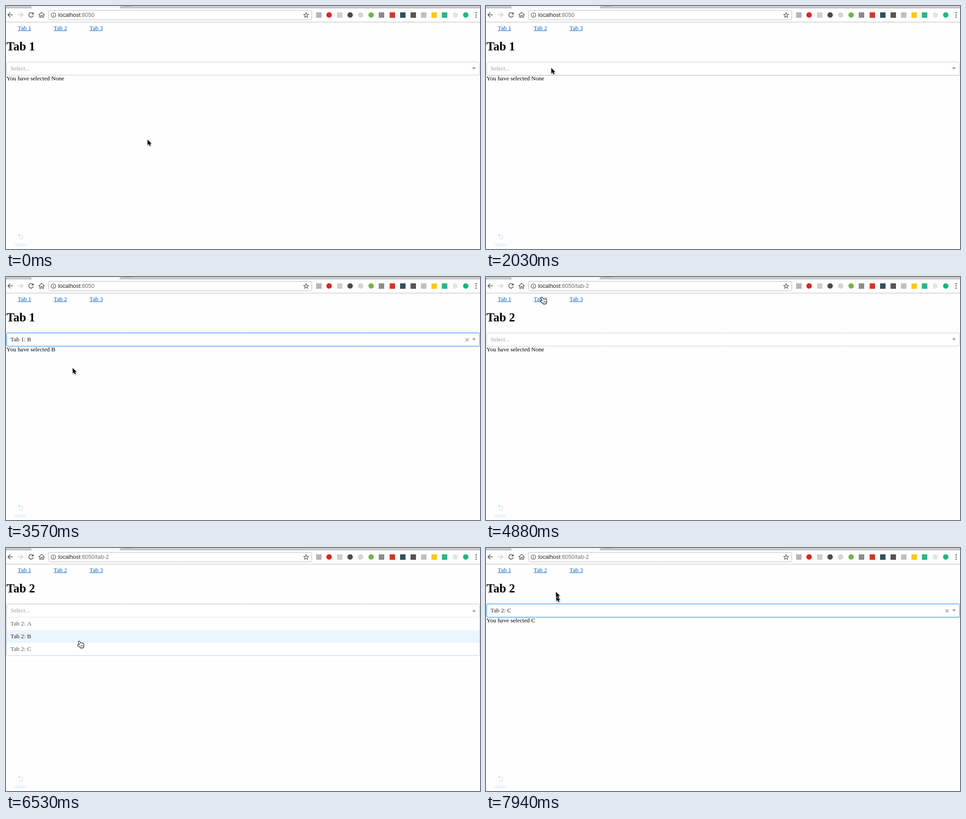
Animation, 1044 px wide and 536 px high, one loop 8000 ms. Source, as an HTML page with a canvas:

```html
<!DOCTYPE html>
<html lang="en">
<head>
<meta charset="utf-8">
<title>Tabs with a dropdown</title>
<style>
html, body { margin: 0; width: 100%; height: 100%; overflow: hidden; background: #fefefe; }
canvas { display: block; }
</style>
</head>
<body>
<canvas id="stage" width="1044" height="536"></canvas>
<script>
const ctx = document.getElementById('stage').getContext('2d');
const LOOP = 8000;
const STEP = 118;
const BLINK = 470;
const SERIF = '"Liberation Serif", serif';
const BODY = '13.2px ' + SERIF;
const URL_FONT = '12.4px "Liberation Sans", sans-serif';
const ROW = { top: 153, height: 28 };

// What the visitor does, in order.
const HOME = { x: 311, y: 294 };
const MOVES = [
  { from: 480, to: 480, x: 194, y: 194 },
  { from: 620, to: 1210, x: 128, y: 91 },
  { from: 1450, to: 2030, x: 143, y: 136 },
  { from: 2270, to: 2740, x: 145, y: 182 },
  { from: 3100, to: 3570, x: 146, y: 200 },
  { from: 3810, to: 4400, x: 123, y: 45 },
  { from: 5110, to: 5580, x: 161, y: 137 },
  { from: 6050, to: 6290, x: 161, y: 206 },
  { from: 6650, to: 6880, x: 163, y: 215 },
  { from: 7240, to: 8060, x: 152, y: 79 }
];
const VISITS = [
  { tab: 1, start: 0, open: 2270, pick: 3330, value: 'B' },
  { tab: 2, start: 4760, open: 5820, pick: 7240, value: 'C' }
];

const ICON_COLORS = ('#b5b5b5 #e2231a #cfcfcf #4b4b4b #d6d6d6 #70b846 #8c8c8c #cf3a2c ' +
  '#31505b #555555 #c0c0c0 #f8cb13 #2fb38c #e4e4e4 #16b987').split(' ');
const ROUND_ICONS = ['#e2231a', '#4b4b4b', '#d6d6d6', '#70b846', '#e4e4e4', '#16b987'];

const ARROW = new Path2D('M0 0V12L2.8 9.4L4.7 13.8L7 12.8L5.1 8.6H8.8Z');
const HAND = new Path2D('M4.8 8.8L2.6 3.2Q2 1.2 3.3 .9Q4.5 .6 5.2 2.2L6.6 5.4' +
  'Q7.6 4 8.7 5.2Q10 4.2 11 5.4Q12.6 5 13 6.6L13.5 9.2Q13.8 11.5 12.5 13.2V14.5' +
  'L7 15L6.4 13.4Q3.8 12.2 1.4 10.3Q.2 9 1.3 8.2Q2.6 7.6 4.8 9.4Z');
const HAND_LINES = new Path2D('M7.3 9.5L7.8 12.3M9.2 9.2L9.7 12M11.1 9L11.4 11.7');

function rect(x, y, w, h, color) {
  ctx.fillStyle = color;
  ctx.fillRect(x, y, w, h);
}

function text(str, x, y, color, font = BODY) {
  ctx.font = font;
  ctx.fillStyle = color;
  ctx.fillText(str, x, y);
  return ctx.measureText(str).width;
}

function stroke(d, color, width = 1) {
  ctx.strokeStyle = color;
  ctx.lineWidth = width;
  ctx.stroke(new Path2D(d));
}

function fill(d, color) {
  ctx.fillStyle = color;
  ctx.fill(new Path2D(d));
}

function circle(x, y, r, color) {
  ctx.beginPath();
  ctx.arc(x, y, r, 0, Math.PI * 2);
  ctx.fillStyle = color;
  ctx.fill();
}

function roundBox(x, y, w, h, r, line, back, width = 1) {
  ctx.beginPath();
  ctx.roundRect(x, y, w, h, r);
  if (back) {
    ctx.fillStyle = back;
    ctx.fill();
  }
  ctx.strokeStyle = line;
  ctx.lineWidth = width;
  ctx.stroke();
}

// Sampled pointer position; a half-step-old image lingers during a move.
function pointerAt(t) {
  const index = MOVES.findLastIndex(m => m.from <= t);
  if (index < 0) return { now: HOME, old: HOME };
  const move = MOVES[index];
  const start = MOVES[index - 1] || HOME;
  const steps = Math.round((move.to - move.from) / STEP) + 1;
  const step = Math.min(steps, Math.floor((t - move.from) / STEP + 0.1) + 1);
  const at = u => ({ x: start.x + (move.x - start.x) * u, y: start.y + (move.y - start.y) * u });
  return { now: at(step / steps), old: at(step < steps ? (step - 0.5) / steps : 1) };
}

function stateAt(t) {
  const visit = VISITS.findLast(v => v.start <= t);
  const open = t >= visit.open && t < visit.pick;
  return {
    tab: visit.tab,
    open,
    value: t >= visit.pick ? visit.value : '',
    caret: open && Math.floor((t - visit.open) / BLINK) % 2 === 0
  };
}

function drawStar(x, y) {
  ctx.beginPath();
  for (let i = 0; i < 10; i++) {
    const r = i % 2 ? 2.4 : 5.8;
    const a = i * Math.PI / 5 - Math.PI / 2;
    ctx.lineTo(x + r * Math.cos(a), y + r * Math.sin(a));
  }
  ctx.closePath();
  ctx.strokeStyle = '#555';
  ctx.lineWidth = 1.1;
  ctx.stroke();
}

function drawToolbar(tab) {
  rect(0, 0, 1044, 4, '#cdcdcd');
  rect(0, 4, 1044, 1, '#a6a6a6');
  fill('M53 0L57 5H250L254 0Z', '#f7f7f7');
  stroke('M53 0L56 4.5M254 0L250 4.5', '#a6a6a6');
  fill('M256 0H278V1H258Z', '#a0a0a0');
  rect(0, 35, 1044, 1, '#b9b9b9');

  stroke('M15 19.5H4.5M9.5 14.3L4.3 19.5L9.5 24.7', '#555', 1.6);
  stroke('M26 19.5H37M32 14.3L37.2 19.5L32 24.7', '#ccc', 1.6);
  stroke('M59 16.3A5 5 0 1 0 60 21', '#555', 1.6);
  fill('M60.8 13.5V18.5H55.8Z', '#555');
  stroke('M72 20L78.5 13.8L85 20M74.2 18.5V25.2H77V21H80V25.2H82.8V18.5', '#555', 1.3);

  roundBox(93.5, 9.5, 580, 21, 3, '#b8b8b8', '#fff');
  stroke('M109.5 20A5 5 0 1 1 99.5 20A5 5 0 1 1 109.5 20M104.5 19V23M104.5 16.5V18', '#555', 1.2);
  const hostWidth = text('localhost', 115, 24, '#222', URL_FONT);
  text(':8050' + (tab === 2 ? '/tab-2' : ''), 115 + hostWidth, 24, '#707070', URL_FONT);
  drawStar(661, 20.3);

  ICON_COLORS.forEach((color, i) => {
    const x = 688.5 + i * 23.15;
    if (ROUND_ICONS.includes(color)) circle(x, 19.8, 6, color);
    else rect(Math.round(x - 6), 14, 12, 12, color);
  });
  for (let i = -1; i <= 1; i++) circle(1035.5, 19.8 + i * 4.8, 1.4, '#555');
}

function drawMenu(tab, row) {
  roundBox(1.5, 152.5, 1042, 85, [0, 0, 3, 3], '#c8c8c8', '#fff');
  rect(2, 152, 1041, 1, '#e6e6e6');
  ['A', 'B', 'C'].forEach((name, i) => {
    const y = ROW.top + i * ROW.height;
    if (i === row) rect(2, y, 1041, ROW.height, '#ebf5ff');
    text(`Tab ${tab}: ${name}`, 10, y + 18, i === row ? '#222' : '#555');
  });
}

function drawSelect({ tab, open, value, caret }, hovered, row) {
  if (value) roundBox(1.5, 123.5, 1042, 29, 3, 'rgba(0,126,255,.12)', null, 5);
  else if (hovered) rect(2, 153, 1041, 1, 'rgba(0,0,0,.12)');
  roundBox(1.5, 123.5, 1042, 29, open ? [3, 3, 0, 0] : 3,
    value ? '#2b8cee' : open ? '#bdbdbd' : '#cccccc', '#fff');

  if (value) {
    text(`Tab ${tab}: ${value}`, 10, 142, '#222');
    stroke('M1012 135L1019 142M1019 135L1012 142', '#999', 1.5);
  } else {
    text('Select...', 10, 142, '#999');
  }
  if (caret) rect(10, 130, 1, 16, '#333');
  fill(open ? 'M1026.5 140.5H1035L1030.75 136Z' : 'M1026.5 135.5H1035L1030.75 140Z', '#999');

  if (open) drawMenu(tab, row);
  else text('You have selected ' + (value || 'None'), 1, 164, '#000');
}

function drawPointer({ x, y }, hand) {
  const shape = hand ? HAND : ARROW;
  ctx.save();
  ctx.translate(hand ? x - 3.4 : x + 0.8, hand ? y - 0.9 : y + 0.8);
  ctx.lineJoin = 'round';
  ctx.shadowColor = 'rgba(0,0,0,.35)';
  ctx.shadowBlur = 2;
  ctx.shadowOffsetY = 1;
  ctx.strokeStyle = hand ? '#000' : '#fff';
  ctx.lineWidth = hand ? 2 : 1.8;
  ctx.stroke(shape);
  ctx.shadowColor = 'transparent';
  ctx.fillStyle = hand ? '#fff' : '#000';
  ctx.fill(shape);
  if (hand) {
    ctx.lineWidth = 0.8;
    ctx.stroke(HAND_LINES);
  }
  ctx.restore();
}

function draw(t) {
  const state = stateAt(t);
  const { now, old } = pointerAt(t);
  const row = Math.max(0, Math.min(2, Math.floor((old.y - ROW.top) / ROW.height)));
  const onLink = old.y > 42 && old.y < 57;
  const hand = onLink || (state.open && old.y >= ROW.top);

  rect(0, 0, 1044, 536, '#fefefe');
  drawToolbar(state.tab);
  for (let i = 0; i < 3; i++) {
    const left = 26 + i * 79;
    const width = text(`Tab ${i + 1}`, left, 53, '#0060d0');
    rect(left, 54, Math.round(width), 1, '#0060d0');
  }
  text(`Tab ${state.tab}`, 1, 98, '#000', 'bold 26.5px ' + SERIF);
  drawSelect(state, old.y > 122 && old.y < ROW.top, row);

  stroke('M28 505.5H33A4.4 4.4 0 1 1 28.6 512', '#c9e6fa', 1.4);
  fill('M26 505.5L30 502V509Z', '#c9e6fa');
  text('undo', 19, 530, '#c9e6fa', '12.7px ' + SERIF);

  if (old.y !== now.y) drawPointer(old, hand);
  drawPointer(now, hand);
}

const began = performance.now();
function tick() {
  draw((performance.now() - began) % LOOP);
  requestAnimationFrame(tick);
}
tick();
</script>
</body>
</html>
```
